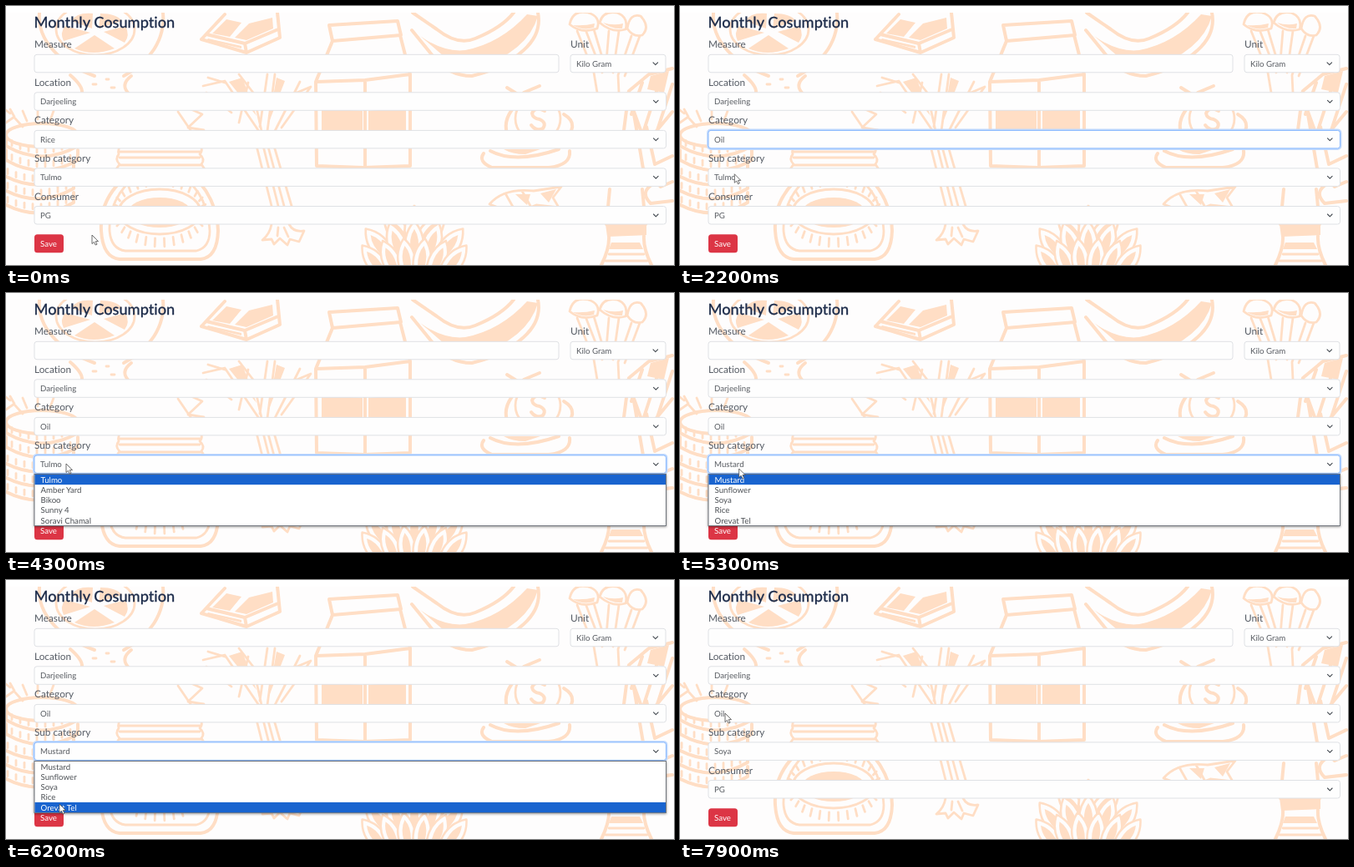
These frames come from a looping animation (800x311 px, 8000 ms). An HTML page:

```html
<!DOCTYPE html>
<html lang="en">
<head>
<meta charset="utf-8">
<title>Monthly form</title>
<style>
html, body { margin: 0; width: 100%; height: 100%; overflow: hidden; background: #fefdfd; }
svg { display: block; width: 800px; height: 311px; font: 9.7px Lato, sans-serif; font-variant-ligatures: none; text-rendering: geometricPrecision; }
.line { fill: none; stroke: #ffdec5; stroke-width: 4; stroke-linecap: round; stroke-linejoin: round; }
.thin { stroke-width: 2.8; }
.solid { fill: #ffdec5; }
.title { font-size: 18.2px; font-weight: 500; fill: #1f2e4c; stroke: #1f2e4c; stroke-width: .25; }
.label { font-size: 11.8px; fill: #555b64; }
.value { fill: #575b61; }
.box { fill: #fefefe; stroke: #dfe1e5; }
.focus .box { stroke: #86b7fe; }
.glow { fill: none; stroke: #c2dafd; stroke-width: 4; visibility: hidden; }
.focus .glow { visibility: visible; }
.chevron { fill: none; stroke: #454b52; stroke-width: 1.1; stroke-linecap: round; stroke-linejoin: round; }
.popup { filter: drop-shadow(0 1px 1.5px #0006); }
</style>
</head>
<body>
<svg viewBox="0 0 800 311">
  <g id="doodles">
    <g id="citrus">
      <path class="line" d="M40 8C37 42 66 70 106 84M188 8C191 40 172 68 141 84M77 83Q92 96 91 104M150 84Q137 94 146 104"/>
      <ellipse class="line thin" cx="107" cy="28" rx="47" ry="31"/>
      <path class="solid" d="M103 27L78 18Q85 7 104 9ZM111 27L113 9Q132 9 139 18ZM101 32L69 42Q64 32 71 24ZM117 31L143 24Q149 35 142 44ZM106 35L82 51Q104 61 130 51Z"/>
      <path class="line thin" d="M104 94h4M120 88h3M126 98h4"/>
    </g>
    <g id="butter">
      <path class="line" d="M234 40L262 10M234 40L288 56L328 38L325 8M240 34L286 45L326 28M286 45L288 56"/>
      <path class="solid" d="M247 33L264 16L282 20L268 37ZM274 38L291 21L319 14L320 27L288 41ZM242 39L282 48V51L240 41Z"/>
    </g>
    <g id="leek">
      <path class="line thin" d="M236 96L262 90L304 152L326 240M262 92L242 86M270 128L240 104M279 82L296 104L306 150M290 92L279 140M313 82L304 145M322 82L313 150M352 91L318 158L342 240M346 105L365 97L330 146M298 160L318 240M311 158L333 240"/>
      <path class="solid" d="M267 91L283 86L300 132ZM324 86L334 90L314 142Z"/>
      <path class="line thin" d="M318 262Q316 274 307 281L318 280L321 286L328 279L337 287L340 280L351 283L357 270Q344 272 339 262M326 266L325 276M333 266L338 277"/>
    </g>
    <g id="carton">
      <path class="line" d="M387 23L469 18L473 35L391 42ZM391 42L371 91L372 192L428 194L484 192L484 82L472 35M371 91L430 89L484 82M430 89V194"/>
      <path class="solid" d="M378 123L427 126V168L378 164ZM434 126L479 122V164L434 168Z"/>
    </g>
    <g id="banana">
      <path class="line" d="M487 8L516 28Q541 48 562 39Q594 26 608 8M637 8Q642 33 620 53Q596 75 558 84Q530 84 512 61L486 29"/>
      <path class="solid" d="M496 36Q524 56 550 53Q592 45 624 10L637 12Q625 55 562 75L540 74Z"/>
    </g>
    <g id="mushrooms">
      <path class="line thin" d="M675 22Q679 4 697 8Q713 13 708 27Q689 34 675 22ZM711 20Q715 5 732 8Q746 14 742 28Q726 33 711 20ZM744 27Q747 8 760 12Q772 25 762 35Q751 38 744 27Z"/>
      <path class="solid" d="M679 23Q693 24 705 21L704 26Q691 30 679 23ZM715 20Q727 24 739 21L738 27Q725 28 715 20Z"/>
      <path class="line thin" d="M684 30L704 80L708 104M695 31L714 80M704 28L718 75M722 30L718 78M734 30L727 80M749 36L733 83L734 104M759 36L741 84"/>
    </g>
    <g id="greens">
      <path class="line" d="M798 75L770 82L746 102L740 149M762 92L749 130M785 84L764 149M798 94L780 149M744 105L760 149M752 130L763 195L784 217L798 211M767 145L777 190L798 180M798 127L779 150M776 213Q758 223 772 237L798 234"/>
      <path class="solid" d="M772 84L794 78L788 104L768 100Z"/>
    </g>
    <g id="money">
      <path class="line" d="M600 98L616 108L605 126Q593 143 604 163M620 104L639 96M668 130Q690 143 665 164M572 177Q565 187 582 194H650Q677 191 675 174M580 174Q610 190 662 172"/>
      <circle class="line thin" cx="637" cy="135" r="27"/>
      <path class="line" d="M645 126Q633 120 630 129Q631 135 639 136Q648 140 643 147Q635 151 629 143"/>
      <path class="solid" d="M596 172H640L622 178Q606 178 596 172Z"/>
    </g>
    <g id="fish">
      <path class="line thin" d="M579 238Q596 218 632 222L665 217L655 230L662 242L635 239Q610 251 579 238M598 225L607 241M618 222L628 240"/>
      <path class="solid" d="M610 226L628 226L624 239ZM640 225L659 220L650 236Z"/>
    </g>
    <g id="coins">
      <ellipse class="line" cx="43" cy="155" rx="43" ry="14"/>
      <path class="line thin" d="M0 140L10 133L5 124M11 135L20 145M20 126L25 138M38 124V136M57 126L53 137M0 125L5 129"/>
    </g>
    <g id="jar">
      <path class="line thin" d="M140 165Q133 171 135 178Q130 184 136 190L132 196M229 165Q238 171 232 178Q239 184 234 190L238 196M136 175H232M136 182H232M136 191H233"/>
      <path class="line" d="M136 212Q112 237 114 270Q116 302 136 304H233Q253 302 254 270Q253 237 232 212"/>
      <path class="line thin" d="M143 216Q123 239 124 270Q126 292 143 294H228Q244 290 244 270Q242 236 224 216"/>
      <ellipse class="line thin" cx="184" cy="247" rx="49" ry="27"/>
      <ellipse class="solid" cx="184" cy="248" rx="38" ry="18"/>
    </g>
    <g id="artichoke"></g>
    <g id="bottle">
      <path class="line" d="M723 220L719 262M762 220L766 262M722 276Q723 291 713 311M764 276Q763 291 773 311"/>
      <path class="solid" d="M718 262H767V275L720 277ZM725 284H759L763 292H722Z"/>
      <path class="line thin" d="M722 298H764M718 306H768"/>
    </g>
    <path class="line thin" d="M206 127L221 149M215 121L235 130L218 146L237 149"/>
  </g>
  <rect width="800" height="8" fill="#fff"/>
  <text class="title" x="33.5" y="26">Monthly Cosumption</text>
  <g id="form"></g>
  <g id="save">
    <rect x="34" y="274.3" width="35" height="22" rx="3.5" fill="#dc3545"/>
    <text x="41" y="289" fill="#fff">Save</text>
  </g>
  <g id="popup" class="popup"></g>
  <path id="cursor" d="M0 0V10.5L2.5 8.3L4.2 12L6 11.2L4.3 7.6H7.5Z" fill="#fff" stroke="#4a4a4a" stroke-width=".8"/>
</svg>
<script>
const byId = id => document.getElementById(id);
const LOOP = 8000, STEP = 100, ROW = 12.25;

// Ridged coin edges
let coins = "";
for (let y = 172; y < 250; y += 17) {
  const shift = y > 205 ? -5 : 0;
  coins += `<path class="line" d="M${shift} ${y - 16}V${y - 4}Q${43 + shift} ${y + 21} ${86 + shift} ${y - 4}V${y - 16}"/>`;
  for (let x = 7; x < 85; x += 10) {
    const sag = 12 * (1 - ((x - 43) / 43) ** 2);
    coins += `<path class="line thin" d="M${x + shift} ${y - 14 + sag}v6"/>`;
  }
}
byId("coins").innerHTML += coins;

// Ribs radiating from the jar label
let ribs = "";
for (let a = 0; a < 360; a += 12) {
  const c = Math.cos(a * Math.PI / 180), s = Math.sin(a * Math.PI / 180);
  ribs += `M${184 + 52 * c} ${247 + 32 * s}L${184 + 56 * c} ${247 + 42 * s}`;
}
byId("jar").innerHTML += `<path class="line thin" d="${ribs}"/>`;

const leaf = (x, y, angle, size) => `<g transform="translate(${x} ${y}) rotate(${angle}) scale(${size})">
  <path class="line thin" style="fill:#fefdfd" d="M0 -26Q17 -7 9 20H-9Q-17 -7 0 -26Z"/>
  <path class="solid" d="M0 -16Q8 -4 4 15H-4Q-8 -4 0 -16Z"/></g>`;
let leaves = "";
for (const [y, spread, count, size] of [[266, 20, 3, 1], [283, 43, 5, .95], [302, 48, 6, .9]]) {
  for (let i = 0; i < count; i++) {
    const side = i / (count - 1) * 2 - 1;
    leaves += leaf(489 + side * spread, y + side * side * 4, side * 38, size);
  }
}
byId("artichoke").innerHTML = leaves;

function field(id, label, value, x, y, width, select = true) {
  const rect = name => `<rect class="${name}" x="${x}" y="${y}" width="${width}" height="21.5" rx="3"/>`;
  return `<g id="${id}"><text class="label" x="${x}" y="${y - 8}">${label}</text>
    ${rect("glow")}${rect("box")}
    <text class="value" x="${x + 7}" y="${y + 14.3}">${value}</text>
    ${select ? `<path class="chevron" d="M${x + width - 15} ${y + 9.5}l2.8 2.8 2.8-2.8"/>` : ""}</g>`;
}
byId("form").innerHTML =
  field("measure", "Measure", "", 34, 58.3, 628, false) +
  field("unit", "Unit", "Kilo Gram", 676, 58.3, 114) +
  field("location", "Location", "Darjeeling", 34, 103.8, 756.5) +
  field("category", "Category", "Rice", 34, 149.4, 756.5) +
  field("sub", "Sub category", "Tulmo", 34, 194.9, 756.5) +
  field("consumer", "Consumer", "PG", 34, 240.5, 756.5);

const categories = ["Select Category", "Rice", "Oil", "Pulses"];
const riceKinds = ["Tulmo", "Amber Yard", "Bikoo", "Sunny 4", "Soravi Chamal"];
const oilKinds = ["Mustard", "Sunflower", "Soya", "Rice", "Orevat Tel"];

const states = [
  { at: 0, category: "Rice", sub: "Tulmo" },
  { at: 1000, category: "Rice", sub: "Tulmo", focus: "category", list: categories, top: 171.5, picked: 1 },
  { at: 2200, category: "Oil", sub: "Tulmo", focus: "category" },
  { at: 4000, category: "Oil", sub: "Tulmo", focus: "sub", list: riceKinds, top: 217.5, picked: 0 },
  { at: 4700, category: "Oil", sub: "Mustard", focus: "sub", list: oilKinds, top: 217.5, picked: 0 },
  { at: 7000, category: "Oil", sub: "Soya", focus: "sub" },
  { at: 7500, category: "Oil", sub: "Soya" }
];
// time, x, y of the pointer tip
const route = [
  [0, 103, 275], [300, 99, 262], [900, 74, 167], [1200, 73, 165], [1500, 73, 165],
  [1900, 66, 201], [2300, 65, 202], [2500, 65, 202], [3200, 60, 199], [3400, 61, 200],
  [4000, 72, 205], [5200, 72, 205], [5800, 64, 241], [6200, 64, 269], [6500, 64, 269],
  [6800, 62, 248], [7100, 62, 248], [7700, 54, 162], [7900, 54, 160], [8000, 54, 160]
];

function pointerAt(t) {
  const next = route.findIndex(p => p[0] > t);
  const [t0, x0, y0] = route[next - 1], [t1, x1, y1] = route[next];
  const k = (t - t0) / (t1 - t0);
  return [x0 + (x1 - x0) * k, y0 + (y1 - y0) * k];
}

function popup({ list, top, picked }, y) {
  if (!list) return "";
  const hover = Math.floor((y - top) / ROW);
  const active = hover >= 0 && hover < list.length ? hover : picked;
  const rows = list.map((name, i) => `<text x="41.5" y="${top + i * ROW + 10}" fill="${i === active ? "#fff" : "#4c5055"}">${name}</text>`);
  return `<rect x="34" y="${top}" width="756.5" height="${list.length * ROW + .7}" fill="#fff" stroke="#70757c"/>
    <rect x="34.5" y="${top + .4 + active * ROW}" width="755.5" height="${ROW}" fill="#1964cf"/>${rows.join("")}`;
}

function draw(now) {
  const t = Math.floor(now % LOOP / STEP) * STEP;
  const state = states.filter(s => s.at <= t).pop();
  const [x, y] = pointerAt(t);
  for (const id of ["category", "sub"]) {
    byId(id).classList.toggle("focus", state.focus === id);
    byId(id).querySelector(".value").textContent = state[id];
  }
  byId("popup").innerHTML = popup(state, y);
  byId("cursor").setAttribute("transform", `translate(${x} ${y})`);
}

const start = performance.now();
function tick() {
  draw(performance.now() - start);
  requestAnimationFrame(tick);
}
tick();
</script>
</body>
</html>
```
